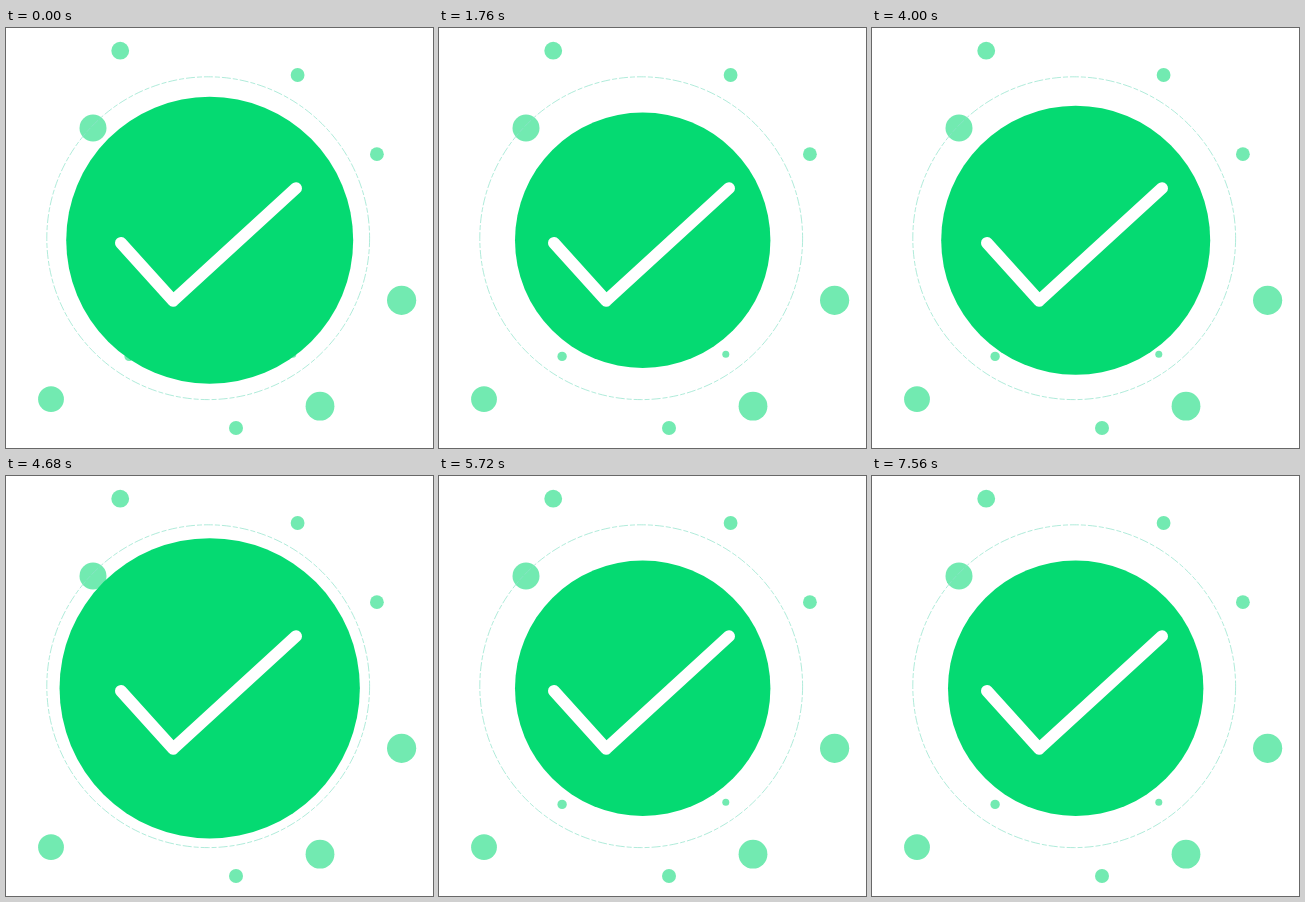
An HTML page that plays this animation: 427 px wide and 420 px high, repeating every 7600 ms.

```html
<!DOCTYPE html>
<html lang="en">
<head>
<meta charset="utf-8">
<title>Success check</title>
<style>
  html, body { margin: 0; width: 100%; height: 100%; overflow: hidden; background: #fff; }
  svg { display: block; width: 427px; height: 420px; }
</style>
</head>
<body>
<svg viewBox="0 0 427 420">
  <g fill="#72eab1">
    <circle cx="114.2" cy="22.7" r="8.9"/>
    <circle cx="291.6" cy="47" r="6.9"/>
    <circle cx="87" cy="100" r="13.5"/>
    <circle cx="370.9" cy="126.2" r="6.9"/>
    <circle cx="395.6" cy="272.3" r="14.6"/>
    <circle cx="45" cy="371.2" r="12.9"/>
    <circle cx="314" cy="378.2" r="14.4"/>
    <circle cx="230" cy="400" r="7"/>
    <circle cx="123.1" cy="328.4" r="4.7"/>
    <circle cx="286.8" cy="326.2" r="3.5"/>
  </g>
  <circle cx="202.2" cy="210.2" r="161.4" fill="none" stroke="#8fe3cb" stroke-width=".7" stroke-dasharray="9 2 5 2"/>
  <circle id="disc" cx="203.7" cy="212.3" r="143" fill="#05da72"/>
  <path d="M115 215 L167.2 272.7 L290 160.2" fill="none" stroke="#fff" stroke-width="12" stroke-linecap="round" stroke-linejoin="round"/>
</svg>
<script>
  const LOOP = 7600, STEP = 40;
  const PERIOD = 5000, PEAK = 4630, HALF = 1000;
  const REST = 127.7, SWELL = 22.6;
  const disc = document.getElementById('disc');
  const start = performance.now();

  // One eased swell around each peak, resting in between.
  function radius(t) {
    const phase = (t - PEAK + 2.5 * PERIOD) % PERIOD - PERIOD / 2;
    const u = Math.min(1, Math.abs(phase) / HALF);
    return REST + SWELL * (1 + Math.cos(Math.PI * u)) / 2;
  }

  function draw() {
    const t = Math.max(0, performance.now() - start) % LOOP;
    disc.setAttribute('r', radius(Math.floor(t / STEP) * STEP).toFixed(2));
    requestAnimationFrame(draw);
  }
  draw();
</script>
</body>
</html>
```
